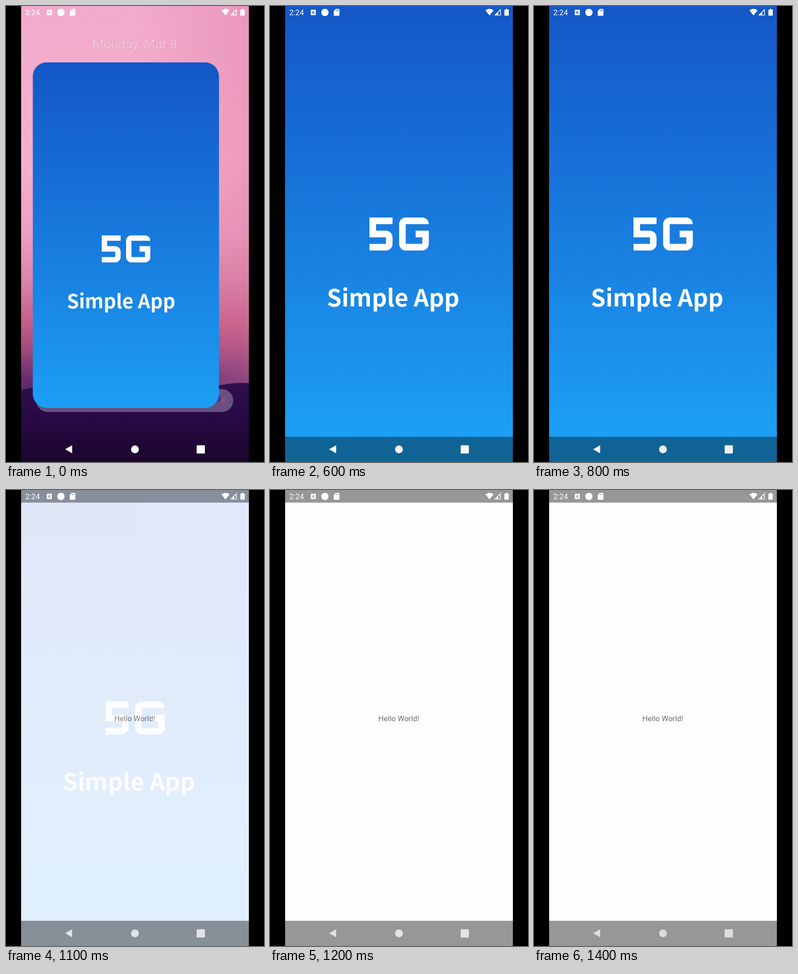
An HTML page that plays this animation: 563x994 px, repeating every 1.6 s.

```html
<!DOCTYPE html>
<html lang="en">
<head>
<meta charset="utf-8">
<title>Splash screen</title>
<style>
  html, body { margin: 0; width: 100%; height: 100%; overflow: hidden; background: #000; }
  svg { display: block; }
  text { font-family: Roboto, sans-serif; }
  .name { font: 700 51.8px "Noto Sans CJK JP", "Noto Sans CJK SC", "Noto Sans CJK", "Noto Sans", sans-serif; }
</style>
</head>
<body>
<svg width="563" height="994" viewBox="0 0 563 994" xmlns="http://www.w3.org/2000/svg">
  <defs>
    <linearGradient id="blue" x1="0" y1="0" x2="0" y2="1">
      <stop offset="0" stop-color="#1457c7"/>
      <stop offset=".5" stop-color="#187cde"/>
      <stop offset=".95" stop-color="#1ca0f5"/>
      <stop offset="1" stop-color="#1ca2f7"/>
    </linearGradient>
    <linearGradient id="sky" gradientUnits="userSpaceOnUse" x1="0" y1="0" x2="0" y2="850">
      <stop offset="0" stop-color="#f2aacc"/>
      <stop offset=".4" stop-color="#f6b0ca"/>
      <stop offset=".58" stop-color="#eda0c1"/>
      <stop offset=".7" stop-color="#db86a8"/>
      <stop offset=".82" stop-color="#c25b87"/>
      <stop offset=".88" stop-color="#a04a7c"/>
      <stop offset=".95" stop-color="#6c2e72"/>
      <stop offset="1" stop-color="#55256b"/>
    </linearGradient>
    <linearGradient id="dusk" x1="0" y1="0" x2="1" y2="0">
      <stop offset=".5" stop-color="#d9769f" stop-opacity="0"/>
      <stop offset="1" stop-color="#d9769f" stop-opacity=".35"/>
    </linearGradient>
    <linearGradient id="hill" gradientUnits="userSpaceOnUse" x1="0" y1="820" x2="0" y2="994">
      <stop offset="0" stop-color="#2f0f4e"/>
      <stop offset=".45" stop-color="#270a45"/>
      <stop offset="1" stop-color="#1b052b"/>
    </linearGradient>
    <clipPath id="card"><rect x="58.3" y="122.7" width="406.5" height="753.3" rx="31"/></clipPath>
    <clipPath id="screen"><rect x="33" width="497" height="994"/></clipPath>
    <g id="app">
      <rect x="33" width="497" height="994" fill="url(#blue)"/>
      <g fill="#fdfcff">
        <path transform="translate(195.4 410.6) scale(7.2)" d="M3 13h5v2H3v2h5c1.1 0 2-.9 2-2v-2c0-1.1-.9-2-2-2H5V9h5V7H3zM17 13h2v2h-5V9h7c0-1.1-.9-2-2-2h-5c-1.1 0-2 .9-2 2v6c0 1.1.9 2 2 2h5c1.1 0 2-.9 2-2v-4h-4z"/>
        <text class="name" x="124" y="655">Simple App</text>
      </g>
    </g>
  </defs>

  <rect width="563" height="994"/>
  <g clip-path="url(#screen)">
    <g id="home">
      <rect x="33" width="497" height="994" fill="url(#sky)"/>
      <rect x="33" y="0" width="497" height="850" fill="url(#dusk)"/>
      <path d="M33 837Q60 830 100 826T300 846T440 833Q490 819 530 822V994H33z" fill="url(#hill)"/>
      <text x="190" y="93.5" font-size="28.2" fill="#b9809a" fill-opacity=".45">Monday, Mar 8</text>
      <text x="189.3" y="92.8" font-size="28.2" fill="#f5cfdf" fill-opacity=".8">Monday, Mar 8</text>
      <rect x="66" y="835" width="430" height="50" rx="25" fill="#69517f"/>
      <circle cx="462.5" cy="856" r="7" fill="#3b3c9c"/>
      <circle cx="474.5" cy="860" r="4.5" fill="#a0456f"/>
      <g clip-path="url(#card)">
        <use href="#app" transform="translate(31.3 122.7) scale(.8185)"/>
      </g>
    </g>

    <g id="splash" opacity="0">
      <use href="#app"/>
      <rect x="33" y="939" width="497" height="55" fill="#106395"/>
      <rect id="edge" x="33" width="497" height="1" fill="#b0688c"/>
    </g>

    <g id="main" opacity="0">
      <rect x="33" width="497" height="994" fill="#fdfcff"/>
      <path d="M33 0h497v27.5H33zM33 939h497v55H33z" fill="#979797"/>
      <text x="236.5" y="503.7" font-size="16.5" fill="#727173">Hello World!</text>
    </g>

    <g fill="#fff">
      <text x="42" y="20" font-size="16.6">2:24</text>
      <path fill-rule="evenodd" d="M90 8h9q1 0 1 1v10q0 1-1 1h-9q-1 0-1-1V9q0-1 1-1zM93.9 10.2L91.2 17.4h1.3l.6-1.6h2.9l.6 1.6h1.3L95.2 10.2zM94.5 11.8l1 2.9h-2z"/>
      <circle cx="119.8" cy="14" r="8"/>
      <path fill-rule="evenodd" d="M143.5 6.3H150q1.5 0 1.5 1.5v12q0 1.5-1.5 1.5h-9.500q-1.500 0-1.500-1.500V11zM143.600 8.500v2.500h1.300v-2.500zM146 8.500v2.500h1.300v-2.500zM148.400 8.500v2.500h1.300v-2.500z"/>
      <path d="M479 20.500L470 9.500Q479 2.500 488 9.500z"/>
      <path fill-rule="evenodd" d="M503.500 6.200V20.500H489.200zM502 10L497.800 14.200V19H502z"/>
      <path d="M514.500 6.300h3.500v1.500h2q1 0 1 1v11.200q0 1-1 1h-7.500q-1 0-1-1V8.800q0-1 1-1h2z"/>
    </g>
    <g id="nav" fill="#fff">
      <path d="M129 966.200L144.300 957.500V975z" stroke-width="1.200" stroke-linejoin="round"/>
      <circle cx="281.400" cy="966.500" r="8.500"/>
      <rect x="416" y="957.500" width="18" height="18" rx="1.500"/>
    </g>
  </g>
</svg>
<script>
  const LOOP = 1600;

  // Each row is [start ms, value]; the value holds until the next row.
  function hold(id, prop, rows) {
    const frames = rows.map(([t, v]) => ({ offset: t / LOOP, [prop]: v, easing: 'step-end' }));
    frames.push({ offset: 1, [prop]: rows[rows.length - 1][1] });
    document.getElementById(id).animate(frames, { duration: LOOP, iterations: Infinity });
  }

  hold('home', 'opacity', [[0, 1], [300, 0]]);
  hold('splash', 'opacity', [[0, 0], [300, 1], [1200, 0]]);
  hold('edge', 'opacity', [[0, 1], [600, 0]]);
  hold('main', 'opacity', [[0, 0], [1000, .44], [1100, .88], [1200, 1]]);
  hold('nav', 'fill', [
    [0, '#fff'], [600, '#fafafd'], [700, '#f5f5f9'], [800, '#f0f0f5'],
    [1000, '#dbe1e8'], [1100, '#e1e3e8'], [1200, '#e2e2e7'], [1300, '#dfdfe3'], [1400, '#dcdce0']
  ]);
</script>
</body>
</html>
```
